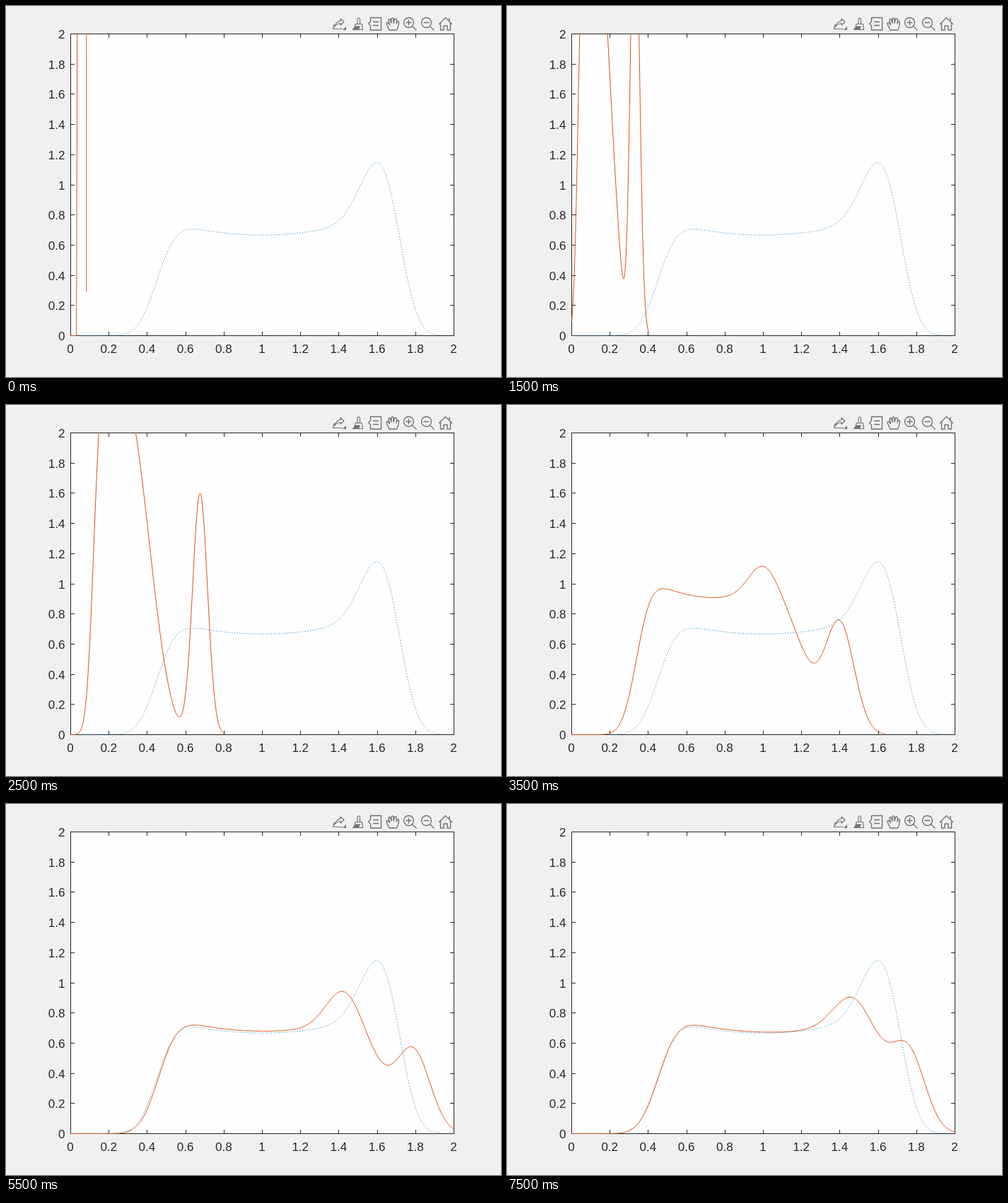
Animation of 700x525 px, one loop 8000 ms. Source, as an HTML page:

```html
<!DOCTYPE html>
<html lang="en">
<head>
<meta charset="utf-8">
<title>Density plot</title>
<style>
html, body { margin: 0; width: 100%; height: 100%; overflow: hidden; background: #f0f0f0; }
svg { display: block; width: 700px; height: 525px; }
text { font: 17px "Liberation Sans", Arial, sans-serif; fill: #262626; }
#axes { fill: none; stroke: #262626; stroke-width: 1; shape-rendering: crispEdges; }
#tools { fill: none; stroke: #727272; stroke-width: 1.4; stroke-linejoin: round; }
#tools .solid { fill: #727272; stroke: none; }
.curve { fill: none; stroke-width: 1; stroke-linejoin: round; }
</style>
</head>
<body>
<svg viewBox="0 0 700 525">
  <defs><clipPath id="plot"><rect x="90.5" y="39" width="543.5" height="429"/></clipPath></defs>
  <rect width="700" height="525" fill="#f0f0f0"/>
  <rect x="91" y="39" width="543" height="428" fill="#fefefe"/>
  <path id="axes"/>
  <g id="labels"></g>
  <g clip-path="url(#plot)">
    <path id="goal" class="curve" stroke="#0072bd" stroke-dasharray="1 2.7"/>
    <path id="estimate" class="curve" stroke="#d95319"/>
  </g>
  <g id="tools">
    <path d="M464 26L462.500 32.500H476M464.500 29Q467 21.500 473 21V18L478 22.500L473 27V24.500Q468 25 464.500 29Z" stroke-width="1.2"/>
    <path class="solid" d="M476 34H481V29Z"/>
    <path d="M497 25V18Q498.500 15.500 500.500 18V25M494 25.500H503.500L504.500 33.500H490.500Q493.500 31 494 25.500Z" stroke-width="1.2"/>
    <path class="solid" d="M494 28.500H501L499 33.500H490.500Q493 32 494 28.500Z"/>
    <path d="M515.500 16.500H530.500V34H515.500V28L512.500 25L515.500 22ZM519 22.500H527M519 27.500H527"/>
    <path d="M542 34L538.500 26.500Q537 23 540 23.500L542.500 26.500L541 20Q541.500 17.500 543.500 19L545 24V18Q546.500 15.500 548 18V24L549.500 18.500Q551.500 17 552.500 19.500L552 25L553 22Q555 21 555.500 23Q555 30 552.500 34Z"/>
    <circle cx="569.500" cy="23.500" r="7"/>
    <path d="M574.500 28.500L580.500 34.500M565.500 23.500H573.500M569.500 19.500V27.500"/>
    <circle cx="594.500" cy="23.500" r="7"/>
    <path d="M599.500 28.500L605.500 34.500M590.500 23.500H598.500"/>
    <path d="M612 26L621.500 16.500L631 26M614.500 24V34H619V28H624V34H628.500V24M627 17V21"/>
  </g>
</svg>
<script>
const STEP_MS = 500, STEPS = 16;
const byId = id => document.getElementById(id);
const px = x => 91.5 + 271 * x;
const py = y => 466.5 - 213.5 * y;

// A density is a shallow parabola between a soft rise and a soft fall,
// with a peak before the fall and a separate bump after it.
// rise, fall: [centre, width]; base: [level, centre, curvature]; peak, bump: [centre, width, height]
const goal = {
  rise: [.455, .0785], base: [.667, 1, .35], fall: [1.736, .0694],
  peak: [1.61, .1, .385], bump: [1.6, .11, 0]
};
const stages = {
  1: { rise: [.032, .009], base: [4, .1, 1], fall: [.12, .025], peak: [.165, .022, 3], bump: [.2, .015, 3.4] },
  3: { rise: [.033, .018], base: [2.9, .12, 1], fall: [.205, .04], peak: [.28, .035, 2.4], bump: [.33, .023, 3.1] },
  5: { rise: [.12, .03], base: [2.45, .25, 1], fall: [.41, .08], peak: [.56, .07, .75], bump: [.675, .039, 1.6] },
  7: { rise: [.343, .06], base: [.908, .75, .97], fall: [1.203, .11], peak: [1, .075, .185], bump: [1.4, .075, .71] },
  9: { rise: [.467, .076], base: [.683, 1, .35], fall: [1.597, .116], peak: [1.415, .09, .275], bump: [1.805, .088, .55] },
  15: { rise: [.457, .079], base: [.673, 1.04, .33], fall: [1.653, .11], peak: [1.47, .1, .21], bump: [1.765, .085, .45] }
};

const bell = (x, [centre, width, height]) => height * Math.exp(-(((x - centre) / width) ** 2) / 2);

// Close approximation of the normal cumulative distribution.
const ramp = (x, [centre, width]) => {
  const z = (x - centre) / width;
  return 1 / (1 + Math.exp(-1.5976 * z - .07056 * z ** 3));
};

function density(x, { rise, base: [level, centre, bend], fall, peak, bump }) {
  const body = level + bend * (x - centre) ** 2 + bell(x, peak);
  return body * ramp(x, rise) * (1 - ramp(x, fall)) + bell(x, bump);
}

function mix(a, b, w) {
  const parts = Object.keys(a).map(key => [key, a[key].map((v, i) => v ** (1 - w) * b[key][i] ** w)]);
  return Object.fromEntries(parts);
}

function stageAt(step) {
  const keys = Object.keys(stages).map(Number);
  const to = keys.find(k => k >= step);
  if (to === step) return stages[step];
  const from = keys[keys.indexOf(to) - 1];
  return mix(stages[from], stages[to], (step - from) / (to - from));
}

const toPath = points => 'M' + points.map(([x, y]) => `${px(x).toFixed(2)},${py(y).toFixed(2)}`).join('L');

function densityPath(stage) {
  const [centre, width] = stage.bump;
  const end = Math.min(2, centre + 3.1 * width);
  const count = Math.ceil(end / .004);
  return toPath(Array.from({ length: count + 1 }, (_, i) => {
    const x = end * i / count;
    return [x, density(x, stage)];
  }));
}

function drawAxes() {
  let d = 'M91.5 39.5H633.5V466.5H91.5Z', labels = '';
  for (let i = 0; i <= 10; i++) {
    const v = i / 5, x = Math.floor(px(v)) + .5, y = Math.floor(py(v)) + .5;
    d += `M${x} 466.5v-5.5M${x} 39.5v5.5M91.5 ${y}h5.5M633.5 ${y}h-5.5`;
    labels += `<text x="${px(v) - .5}" y="491" text-anchor="middle">${v}</text>` +
      `<text x="83.5" y="${Math.round(py(v) + 6.5)}" text-anchor="end">${v}</text>`;
  }
  byId('axes').setAttribute('d', d);
  byId('labels').innerHTML = labels;
  byId('goal').setAttribute('d', densityPath(goal));
}

// The run opens with a bare spike, then widens.
const spike = toPath([[0, 0], [.03, 0], [.034, 2.1], [.082, 2.1], [.082, .29]]);
const paths = Array.from({ length: STEPS }, (_, i) => i ? densityPath(stageAt(i)) : spike);
const estimate = byId('estimate');

function render(ms) {
  estimate.setAttribute('d', paths[Math.floor(ms / STEP_MS) % STEPS]);
}

drawAxes();
const start = performance.now();
function tick() {
  render(performance.now() - start);
  requestAnimationFrame(tick);
}
tick();
</script>
</body>
</html>
```
